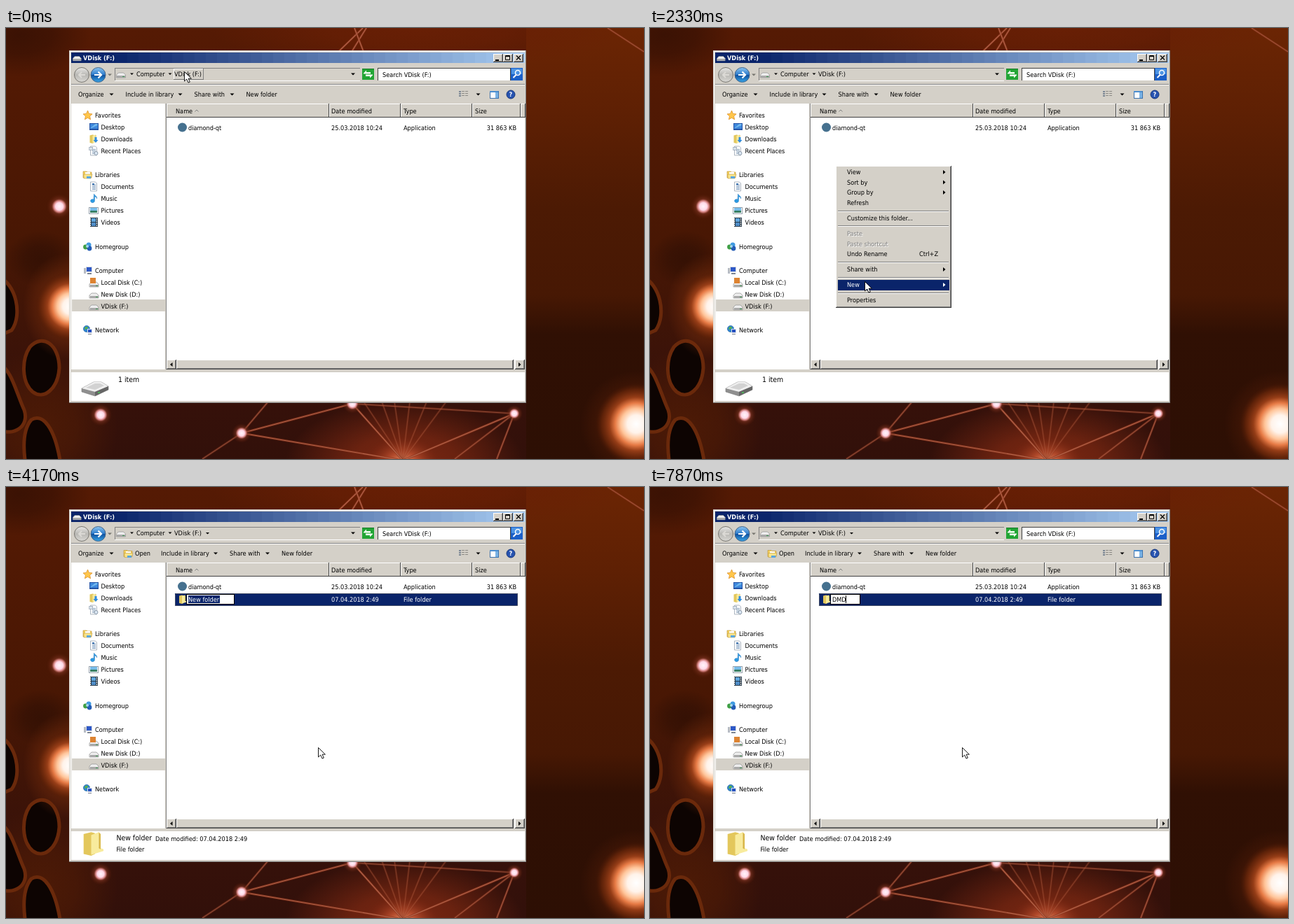
An HTML page that plays this animation: 910 px wide and 616 px high, repeating every 8000 ms.

```html
<!DOCTYPE html>
<html lang="en">
<head>
<meta charset="utf-8">
<title>Creating a folder</title>
<style>
html, body { margin: 0; width: 100%; height: 100%; overflow: hidden; background: #3a1404; }
svg { display: block; width: 910px; height: 616px; }
text { font: 9.1px "DejaVu Sans Condensed", "Liberation Sans", sans-serif; white-space: pre; text-rendering: geometricPrecision; }
rect { shape-rendering: crispEdges; }
.big { font-size: 10.4px; }
.bold { font-weight: bold; }
.end { text-anchor: end; }
</style>
</head>
<body>
<svg id="stage" viewBox="0 0 910 616" xmlns="http://www.w3.org/2000/svg"></svg>
<script>
const FACE = '#d4d0c8', NAVY = '#0a246a', SHADE = '#808080', DARK = '#404040';

// Drawing helpers: each returns markup
const rect = (x, y, w, h, fill, more = '') => `<rect x="${x}" y="${y}" width="${w}" height="${h}" fill="${fill}" ${more}/>`;
const path = (d, fill, stroke = 'none', width = 1) => `<path d="${d}" fill="${fill}" stroke="${stroke}" stroke-width="${width}"/>`;
const disc = (x, y, r, fill, stroke = 'none', width = 1) => `<circle cx="${x}" cy="${y}" r="${r}" fill="${fill}" stroke="${stroke}" stroke-width="${width}"/>`;
const text = (x, mid, s, fill = '#000', cls = '') => `<text x="${x}" y="${mid + 3.4}" fill="${fill}" class="${cls}">${s}</text>`;
const group = (id, body) => `<g id="${id}">${body}</g>`;
const at = (x, y, body, k = 1) => `<g transform="translate(${x} ${y}) scale(${k})">${body}</g>`;
const down = (x, y, w = 6, fill = '#000') => path(`M${x - w / 2},${y - 1.5}h${w}l${-w / 2},${w / 2}z`, fill);
const right = (x, y, fill = '#000') => path(`M${x},${y - 3}v6l3.5,-3z`, fill);
const left = (x, y) => path(`M${x},${y - 3}v6l-3.5,-3z`, '#000');
const raised = (x, y, w, h) => rect(x, y, w, h, DARK) + rect(x, y, w - 1, h - 1, '#fff') +
  rect(x + 1, y + 1, w - 2, h - 2, SHADE) + rect(x + 1, y + 1, w - 3, h - 3, FACE);
const rule = (x, y, w) => rect(x, y, w, 1, SHADE) + rect(x, y + 1, w, 1, '#fff');

// Icons, about 13 px square
const folder = path('M1,1.5l4,-1l2,.5v11l-2,1l-4,-1z', '#e3c75c') + path('M5,2l4,-1.500v8l2.500,1v1l-6.500,2z', '#f8eb9d') + path('M9,.5l1,1v8l-1,-.5z', '#d9b849');
const openFolder = path('M0,2h5l1,1h6v8h-12z', '#f3cf5d', '#b98f31', .6) + rect(3, 3, 7, 3, '#fff') + path('M1,6h12l-2,6h-10z', '#fae38a', '#c29b3a', .6) + rect(5, 9, 6, 3, '#5aa6de');
const drive = path('M.5,8l3,-3h7l3,3v4h-13z', '#eee', '#8d8d8d', .7) + rect(1, 8.500, 12, 3, '#a9a9a9') + rect(9, 9.500, 3, 1, '#3d9a52');
const sheet = path('M2,0h7l2,2v11h-9z', '#fdfdfd', '#8b98a8', .7);
const screen = rect(0, 1, 13, 10, '#2453a5') + rect(1, 2, 11, 7, '#3f88dc') + path('M1,9l8,-7h3v2z', '#71b8ee');
const monitor = rect(1, 3, 3, 8, '#b7bcc4') + rect(4, 1, 9, 8, '#d7dbe2') + rect(5, 2, 7, 6, '#2d58c7') + rect(6, 10, 6, 1.5, '#7d8590');
const globe = disc(5, 5, 4.6, '#2f86cf', '#1c5b9a', .6) + path('M3,2l4,0l-1,3l-4,1z', '#59b04b');
const lines = c => [4, 6, 8, 10].map(y => rect(4, y, 5, 1, c)).join('');
const icons = {
  folder, openFolder, drive, screen, monitor,
  star: path('M6.5,0l2,4.4l4.6,.5l-3.5,3.2l1,4.7l-4.1,-2.4l-4.1,2.4l1,-4.7l-3.4,-3.2l4.5,-.5z', '#ffc64a', '#d98920', .7),
  downloads: folder + path('M8,4h3v4h2l-3.5,4l-3.5,-4h2z', '#2f8be0'),
  recent: sheet + lines('#8aa4bd') + rect(0, 1, 5, 4, '#d9e3ec', 'stroke="#8b98a8" stroke-width=".6"') + disc(10, 10, 2.5, '#dce8f4', '#6c7c8f', .7),
  doc: sheet + lines('#7798bd') + rect(4, 2, 3, 2, '#4c7db5'),
  music: path('M7,0c1,3 5,3 4,7c0,-2 -2,-3 -3,-3v6a3,2.5 0 1 1 -1.5,-2z', '#2c9ae2', '#1a6db5', .4),
  picture: rect(0, 2, 13, 9, '#fff', 'stroke="#7d8b99" stroke-width=".8"') + rect(1.5, 3, 10, 4, '#77bce9') + rect(1.5, 7, 10, 3, '#3a8066'),
  video: rect(1, 0, 11, 13, '#263746') + rect(3.5, 1, 6, 5, '#5fa5dc') + rect(3.5, 7, 6, 5, '#4f8cc6') + [1, 4, 7, 10].map(y => rect(1.7, y, 1, 1.5, '#fff') + rect(10.3, y, 1, 1.5, '#fff')).join(''),
  home: disc(8, 4, 3.5, '#3f9ae0') + disc(3.5, 7, 3.4, '#3f9f45') + disc(9, 9, 3.4, '#245cb5') + disc(6, 6, 2, '#a5d6f1'),
  system: at(0, 1, drive) + rect(1, 0, 8, 8, '#dd8332'),
  network: globe + rect(6, 5, 7, 6, '#dce1e8') + rect(7, 6, 5, 4, '#254fc0') + rect(7, 11.5, 5, 1, '#747c88'),
  shortcut: rect(1, 0, 11, 12, '#fff', 'stroke="#8c8c9c" stroke-width=".8"') + path('M3.5,9.5q0,-4 3,-4.500l-1.500,-2h5v5l-1.700,-1.500q-2.500,.5 -4.800,3z', '#27408e'),
  bitmap: rect(1, 2, 11, 9, '#f2e9da', 'stroke="#a08a70" stroke-width=".7"') + path('M2,9l3,-5l3,3l2,-2l2,4z', '#d8672b') + rect(3, 9, 7, 1.500, '#5583bb'),
  contact: rect(0, 2, 13, 9, '#e8f4fb', 'stroke="#4d86ad" stroke-width=".9"') + rect(2, 5, 4, 4, '#4b9fd0') + rect(7, 5, 4, 1, '#557') + rect(7, 7, 4, 1, '#557'),
  journal: sheet + disc(6.500, 7, 3, '#5c9fd4', '#2f6ea8', .7) + rect(5, 6, 3, 1, '#fff'),
  pack: rect(1, 1, 11, 11, '#85395f'),
  txt: sheet + lines('#c5ccd6'),
  briefcase: path('M4,3v-2h5v2', 'none', '#6b3b12', 1.2) + rect(1, 3, 11, 9, '#cf7427', 'stroke="#84450f" stroke-width=".7"') + rect(1, 6, 11, 1.500, '#f2b15f')
};
const icon = (name, x, mid) => at(x, mid - 6.500, icons[name]);

// Wallpaper: soft patches of light, glowing nodes and links
let paints = 0;
const stopList = stops => stops.map(([o, c, a = 1]) => `<stop offset="${o}" stop-color="${c}" stop-opacity="${a}"/>`).join('');
function glow(x, y, rx, ry, ...stops) {
  const id = 'paint' + paints++;
  return `<radialGradient id="${id}">${stopList(stops)}</radialGradient><ellipse cx="${x}" cy="${y}" rx="${rx}" ry="${ry}" fill="url(#${id})"/>`;
}
function column(x, w, ...stops) {
  const id = 'paint' + paints++;
  return `<linearGradient id="${id}" x2="0" y2="1">${stopList(stops)}</linearGradient>` + rect(x, 0, w, 616, `url(#${id})`);
}
const patch = (x, y, rx, ry, c, a = 1) => glow(x, y, rx, ry, [0, c, a], [.45, c, a * .75], [1, c, 0]);
const node = (x, y, r) => glow(x, y, r * 2, r * 2, [0, '#fff4fa', 1], [.3, '#ffd9e8', 1], [.45, '#e58f90', .9], [.6, '#7d3322', .6], [1, '#5b1c08', 0]);
const sun = (x, y, r) => glow(x, y, r, r, [0, '#fff'], [.22, '#fff3ea'], [.38, '#ffc59a'], [.52, '#e67a45'], [.66, '#9a3f18', .95], [.85, '#6b270a', .7], [1, '#4a1805', 0]);
const link = (x1, y1, x2, y2, a = .75) => `<g stroke-opacity="${a}">${path(`M${x1},${y1}L${x2},${y2}`, 'none', '#8a351d', 3)}${path(`M${x1},${y1}L${x2},${y2}`, 'none', '#c4745a', 1.2)}</g>`;
const hollow = d => path(d, '#0d0402', '#6a290b', 5);

function wallpaper() {
  const rays = [-56, -30, -12, 10, 34, 62].map(dx => link(566, 618, 566 + dx, 534, .3)).join('');
  return column(0, 910, [0, '#551a04'], [.5, '#481704'], [.86, '#36110a'], [1, '#32100a']) +
    column(742, 168, [0, '#6b2504'], [.2, '#5e2004'], [.42, '#4c1a04'], [.62, '#471804'], [.71, '#301004'], [1, '#2d0f04']) +
    patch(590, 0, 300, 60, '#681f05') + patch(20, 10, 100, 60, '#3b1204') + patch(50, 330, 50, 40, '#351104') +
    patch(50, 570, 110, 110, '#4c1a06') +
    hollow('M-10,356C14,366 24,410 8,432L-10,440z') + hollow('M34,456C52,436 76,452 76,486C74,516 54,532 38,520C22,506 22,474 34,456z') +
    hollow('M-10,480C8,488 14,520 26,546C34,570 10,584 -10,574z') + hollow('M36,560C52,550 70,570 78,624H28C24,598 24,574 36,560z') +
    patch(568, 622, 170, 90, '#7c2812') + glow(566, 622, 54, 40, [0, '#f09a70', 1], [.4, '#bd5030', .8], [1, '#71200d', 0]) +
    link(514, 0, 493, 34) + link(509, 0, 474, 34) + link(497, 0, 510, 34) + link(858, 0, 910, 34, .5) + rays +
    link(336, 579, 494, 537) + link(336, 579, 566, 618) + link(336, 579, 374, 534, .5) + link(336, 579, 280, 616, .45) +
    link(494, 537, 566, 618) + link(494, 537, 725, 551, .45) + link(725, 551, 566, 618) + link(725, 551, 640, 616, .5) + link(725, 551, 700, 616, .6) +
    patch(86, 398, 62, 76, '#742c0c', .9) + sun(92, 398, 50) + patch(899, 566, 80, 76, '#5a1f08', .8) + sun(899, 566, 58) +
    node(76, 255, 9) + node(135, 553, 8) + node(336, 579, 7) + node(494, 537, 7) + node(725, 551, 6);
}

function titleBar() {
  const from = [10, 36, 106], to = [166, 202, 240];
  let s = '';
  for (let x = 93; x < 740; x += 16) {
    const k = Math.max(0, (x - 150) / 575);
    s += rect(x, 35, Math.min(16, 740 - x), 15, `rgb(${from.map((c, i) => Math.round(c + (to[i] - c) * k))})`);
  }
  s += at(95, 36, drive, .9) + text(110, 42.500, 'VDisk (F:)', '#fff', 'bold');
  s += [695, 709, 724].map(x => raised(x, 37, 14, 12)).join('');
  return s + rect(698, 45, 5, 1.500, '#000') + path('M712.500,39.500h6v6h-6zM712,40.500h7', 'none', '#000') + path('M728,39.500l6,6m0,-6l-6,6', 'none', '#000', 1.300);
}

function addressBar() {
  return `<linearGradient id="blue" x2="0" y2="1"><stop stop-color="#8cc5f2"/><stop offset=".48" stop-color="#2e7ccb"/><stop offset=".52" stop-color="#0f519f"/><stop offset="1" stop-color="#38a5e8"/></linearGradient>` +
    `<linearGradient id="grey" x2="0" y2="1"><stop stop-color="#e8e8e6"/><stop offset=".5" stop-color="#b9b8b4"/><stop offset="1" stop-color="#d9d8d4"/></linearGradient>` +
    disc(108, 67, 10.500, 'url(#grey)', '#77756f') + path('M113,67h-9m4,-4l-4,4l4,4', 'none', '#dcdad6', 2) +
    disc(131.500, 67, 10.500, 'url(#blue)', '#426488') + path('M126,67h10m-4.500,-4.500l4.500,4.500l-4.500,4.500', 'none', '#fff', 2.200) +
    down(148, 67, 6, '#77756f') +
    rect(155, 57, 350, 1, SHADE) + rect(155, 57, 1, 18, SHADE) + rect(155, 75, 350, 1, '#fff') +
    at(157, 59, drive) + down(179.500, 66, 5) + text(186, 66, 'Computer') + down(234, 66, 5) +
    group('crumbHover', rect(239, 58, 43, 16, SHADE) + rect(239, 58, 42, 15, '#fff') + rect(240, 59, 41, 14, FACE)) +
    text(240, 66, 'VDisk (F:)') + group('crumbArrow', down(287.500, 66.500, 5)) + down(495, 66, 6) +
    rect(508, 58, 17, 16, '#22a535') + rect(508, 58, 17, 1, '#187a28') +
    path('M510,64.500l4,-4v2.500h6v2.500h-10zM523,67.500l-4,4v-2.500h-6v-2.500h10z', '#f2fff2') +
    rect(530, 57, 190, 18, DARK) + rect(531, 58, 188, 17, '#fff') + text(537, 66.500, 'Search VDisk (F:)') +
    rect(720, 57, 17, 18, '#1b5fc8') + rect(721, 58, 15, 8, '#4d94e4') +
    disc(730, 64, 3.500, 'none', '#fff', 1.500) + path('M727.500,67l-4,4', 'none', '#fff', 2);
}

// Command row; the entries shift when a folder is selected
const commands = (x, s) => text(x, 95, 'Include in library') + down(x + 78, 95) + text(x + 98, 95, 'Share with') + down(x + 152, 95) + text(x + 172, 95, 'New folder') + s;
function commandBar() {
  return rule(93, 80, 647) + text(103, 95, 'Organize') + down(150.500, 95) +
    group('plainBar', commands(170.500, '')) +
    group('pickBar', commands(221, icon('openFolder', 168, 95) + text(184, 95, 'Open'))) +
    [91, 94, 97].map(y => rect(646, y - 1, 3, 2, '#7b8794') + rect(650, y - 1, 4, 1, '#8c8a85') + rect(655, y - 1, 4, 1, '#8c8a85')).join('') +
    down(673.500, 95) + rect(690, 90, 12, 10, '#fff', 'stroke="#3c72ad"') + rect(690, 90, 12, 2, '#4b8ed0') + rect(698, 92, 4, 8, '#79b2e4') +
    disc(720, 95, 6, '#2753b0', '#173779') + text(717.600, 95, '?', '#fff', 'bold');
}

function sidebar() {
  const tree = [
    [124, 'star', 'Favorites', 0], [141, 'screen', 'Desktop', 1], [158, 'downloads', 'Downloads', 1], [175, 'recent', 'Recent Places', 1],
    [209, 'openFolder', 'Libraries', 0], [226, 'doc', 'Documents', 1], [243, 'music', 'Music', 1], [260, 'picture', 'Pictures', 1], [277, 'video', 'Videos', 1],
    [312, 'home', 'Homegroup', 0],
    [346, 'monitor', 'Computer', 0], [363, 'system', 'Local Disk (C:)', 1], [380, 'drive', 'New Disk (D:)', 1], [397, 'drive', 'VDisk (F:)', 1],
    [431, 'network', 'Network', 0]];
  return rect(93, 108, 134, 380, '#fff') + rect(94, 388, 133, 17, FACE) +
    tree.map(([y, pic, name, sub]) => icon(pic, sub ? 118.500 : 110, y + .5) + text(sub ? 135.500 : 127, y + .3, name)).join('');
}

function fileList() {
  const edges = [229, 461, 563, 665, 734, 741];
  let s = rect(229, 108, 511, 380, '#fff') + rect(228, 108, 1, 380, SHADE);
  edges.slice(0, -1).forEach((x, i) => {
    const w = edges[i + 1] - x;
    s += rect(x, 108, w, 20, DARK) + rect(x, 108, w - 1, 19, '#fff') + rect(x + 1, 109, w - 2, 18, FACE);
  });
  return s + text(242, 118.500, 'Name') + path('M269.500,119.500l2.500,-2.500l2.500,2.500', 'none', SHADE) +
    text(464, 118.500, 'Date modified') + text(567, 118.500, 'Type') + text(669, 118.500, 'Size') +
    disc(251.500, 142, 6.500, '#46718f') + text(260, 142.500, 'diamond-qt') + text(464, 142.500, '25.03.2018 10:24') + text(567, 142.500, 'Application') +
    text(728, 142.500, '31 863 KB', '#000', 'end') +
    rect(229, 474, 511, 14, '#e9e7e3') + raised(229, 474, 14, 14) + raised(243, 474, 481, 14) + raised(726, 474, 14, 14) +
    left(237.500, 481) + right(731, 481);
}

const bigDrive = path('M108,515l17,-9h11l10,6v5l-19,9l-19,-6z', '#8f8f8f', '#777', .6) + path('M108,515l17,-9h11l10,6l-19,8z', '#efefef') +
  path('M114,514l13,-6h7l6,3l-13,6z', '#d2d2d2') + path('M127,520l19,-8v5l-19,9z', '#666') + rect(131, 520, 3, 2, '#4fb05b');

function details() {
  return rect(93, 488, 647, 4, FACE) + rect(93, 492, 647, 41, '#fff') +
    group('countInfo', bigDrive + text(160, 502.500, '1 item', '#000', 'big')) +
    group('folderInfo', at(108, 492, folder, 2.700) + text(157.500, 502, 'New folder', '#000', 'big') +
      text(213, 503, 'Date modified: 07.04.2018 2:49') + text(157.500, 518, 'File folder'));
}

const newRow = () => group('newRow', rect(241, 152, 489, 18, NAVY) +
  rect(241.500, 152.500, 488, 17, 'none', 'stroke="#77705f" stroke-dasharray="1 1"') + icon('folder', 246, 160.500) +
  text(464, 161, '07.04.2018 2:49', '#fff') + text(567, 161, 'File folder', '#fff') + group('edit', ''));

// Menus
const menuItems = [[206, 'View', 1], [220.500, 'Sort by', 1], [235, 'Group by', 1], [249.500, 'Refresh'], [272, 'Customize this folder...'],
  [294, 'Paste', 0, 1], [308.500, 'Paste shortcut', 0, 1], [323, 'Undo Rename'], [345, 'Share with', 1], [367, 'New', 1], [389, 'Properties']];
const newItems = [['folder', 'Folder'], ['shortcut', 'Shortcut'], ['bitmap', 'Bitmap image'], ['contact', 'Contact'], ['journal', 'Journal Document'],
  ['pack', 'Архив VelPOM'], ['doc', 'Rich Text Document'], ['txt', 'Text Document'], ['pack', 'Архив ZIP - VelPOM'], ['briefcase', 'Briefcase']];

function menu(hot) {
  return raised(265, 197, 165, 203) + [261, 282, 334, 356, 378].map(y => rule(268, y, 158)).join('') +
    menuItems.map(([y, name, more, off]) => {
      const on = name === hot, ink = off ? SHADE : on ? '#fff' : '#000';
      return (on ? rect(268, y - 7, 159, 15, NAVY) : off ? text(282, y + 1, name, '#fff') : '') + text(281, y, name, ink) +
        (more ? right(418, y, ink) : '') + (name === 'Undo Rename' ? text(384, y, 'Ctrl+Z') : '');
    }).join('');
}

function submenu(hot) {
  return raised(424, 358, 138, 166) + rule(428, 394, 130) + newItems.map(([pic, name], i) => {
    const y = i < 2 ? 368 + i * 15.500 : 406.500 + (i - 2) * 15.350, on = hot && !i;
    return (on ? rect(427, 361, 132, 15, NAVY) : '') + icon(pic, 429, y + .5) + text(443.500, y, name, on ? '#fff' : '#000');
  }).join('');
}

document.getElementById('stage').innerHTML = wallpaper() +
  rect(90, 32, 652, 504, SHADE) + rect(90, 32, 651, 503, FACE) + rect(91, 33, 649, 501, '#fff') + rect(92, 34, 648, 500, FACE) +
  titleBar() + addressBar() + commandBar() + sidebar() + fileList() + details() + newRow() + group('menu', '') + group('submenu', '') +
  group('cursor', path('M.5,.5v13.500l3.200,-2.900l2.300,5l2.300,-1l-2.200,-4.900h4.300z', '#fff', '#000', .9));

const el = id => document.getElementById(id);
const show = (id, on) => el(id).setAttribute('display', on ? 'inline' : 'none');
const cache = {};
function fill(id, html) {
  if (cache[id] !== html) el(id).innerHTML = cache[id] = html;
}
const last = (list, t) => list.filter(e => e[0] <= t).pop();

// Pointer: time, x, y
const moves = [[0, 254, 62], [740, 257, 96], [860, 263, 165], [980, 265, 197],
  [1970, 273, 218], [2090, 289, 275], [2210, 302, 342], [2330, 306, 362],
  [2950, 330, 365], [3070, 402, 369], [3190, 445, 372]];
// Rename box: time, text, caret x, box end
const typed = [[3680, 'New folder', 305, 326], [5030, 'D', 267, 287], [6150, 'DM', 273, 294], [6880, 'DMD', 279, 300]];
// Caret: time, visible
const blinks = [[3680, 1], [4170, 0], [4660, 1], [5530, 0], [6150, 1], [6640, 0], [6880, 1], [7380, 0], [7870, 1]];

function editBox(t) {
  const [, s, caret, edge] = last(typed, t), all = s === 'New folder';
  return rect(257, 153, edge - 257, 15, '#000') + rect(258, 154, edge - 259, 13, '#fff') +
    (all ? rect(260, 155, 45, 11, NAVY) : '') + text(260, 161, s, all ? '#fff' : '#000') +
    (last(blinks, t)[1] ? rect(caret, 155, 1, 11, '#000') : '');
}

function draw(t) {
  const [, x, y] = last(moves, t);
  el('cursor').setAttribute('transform', `translate(${x} ${y})`);

  const menuOpen = t >= 1350 && t < 3560, subOpen = t >= 2700 && t < 3560, made = t >= 3680;
  const over = x > 268 && menuItems.find(([mid]) => Math.abs(mid - y) < 7.300);
  fill('menu', menuOpen ? menu(t >= 2330 ? 'New' : over && over[1]) : '');
  fill('submenu', subOpen ? submenu(x > 427) : '');

  show('crumbHover', t < 740);
  show('crumbArrow', t >= 3920);
  show('plainBar', !made);
  show('pickBar', made);
  show('countInfo', !made);
  show('folderInfo', made);
  show('newRow', made);
  fill('edit', made ? editBox(t) : '');
}

function tick() {
  draw(performance.now() % 8000);
  requestAnimationFrame(tick);
}
tick();
</script>
</body>
</html>
```
